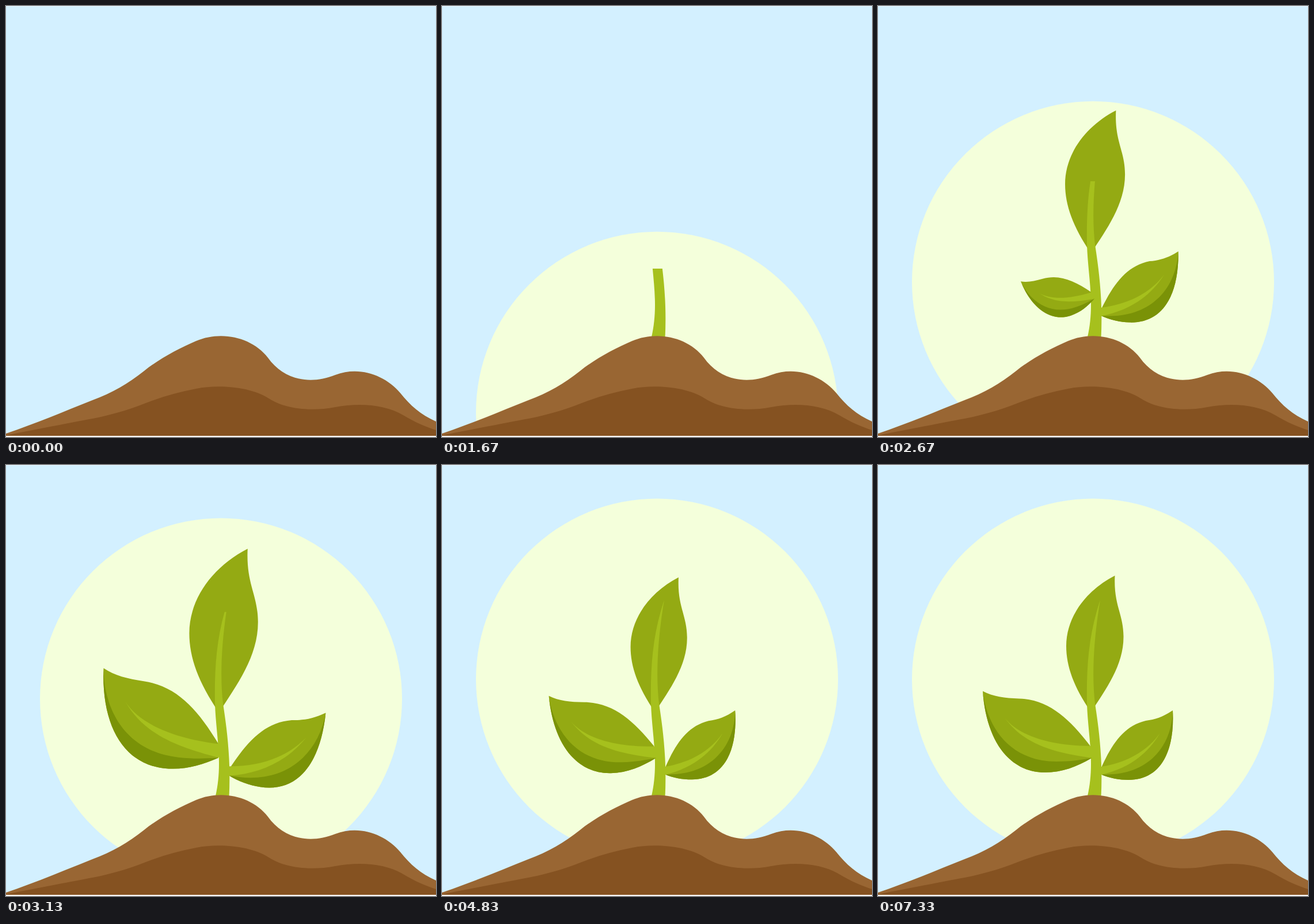
Write an HTML page that moves like this. It is 747 px wide and 750 px high and loops after 8 s.

```html
<!DOCTYPE html>
<html lang="en">
<head>
<meta charset="utf-8">
<title>Sprouting plant</title>
<style>
  html, body { margin: 0; width: 100%; height: 100%; overflow: hidden; background: #fff; }
  svg { display: block; width: 100%; height: 100%; }
  .sky { fill: #d3f0ff; }
  .sun { fill: #f4ffdb; }
  .soil { fill: #996633; }
  .deep { fill: #855221; }
  .stem { fill: #a6c01d; }
  .leaf { fill: #94aa13; }
  .shade { fill: #7a9207; }
</style>
</head>
<body>
<svg viewBox="0 0 747 750">
  <defs>
    <clipPath id="reveal"><rect id="window" x="340" y="600" width="70" height="500"/></clipPath>
  </defs>
  <rect class="sky" y=".5" width="747" height="747.5"/>
  <circle class="sun" id="sun" cx="373.5" cy="1000" r="314.5"/>

  <path class="leaf" id="top" d="M411.5 192.5C362 218 327 264 327 315C327 350 340 386 370 430C396 390 427 348 426.5 298C426 258 409 244 411.5 192.5Z"/>

  <path class="stem" clip-path="url(#reveal)" d="M364 576C368 558 370 540 370 520C370 485 364 450 363 415C362 350 366 295 386 235C375 300 371 365 377 415C383 455 391 510 387.5 578Z"/>

  <g id="left">
    <path class="leaf" d="M182 393.5C200 403 220 405.5 245 406.5C296 408 332 441 368 488L371 510C345 525 320 535 290 535C228 535 188 480 182 393.5Z"/>
    <path class="shade" d="M182 393.5C188 450 225 516 310 516C335 516 352 513 371 510C345 525 320 535 290 535C228 535 188 480 182 393.5Z"/>
    <path class="stem" d="M221 441C246 472 300 488 368 489L380 490V505L370 509.5C310 501 255 488 221 441Z"/>
  </g>

  <g id="right">
    <path class="leaf" d="M512 427C496 438 482 443 465 445C428 454 408 483 389 524L386 538C402 545 420 548 435 548C487 548 516 505 512 427Z"/>
    <path class="shade" d="M512 427C511 490 468 542 388 538.5C402 545 420 548 435 548C487 548 516 505 512 427Z"/>
    <path class="stem" d="M489.5 467C466 500 430 518 388 525L380 527V537L388 539C431 529 467 506 489.5 467Z"/>
  </g>

  <path class="soil" d="M0 744C50 727 100 706 150 686C185 673 212 657 240 635C266 614 300 596 330 583C375 564 428 577 455 612C482 650 527 660 572 642C615 626 659 643 685 673.5C702 695 720 711 747 723V748H0Z"/>
  <path class="deep" d="M0 747C60 735 130 722 165 715C195 708 220 700 240 692C270 680 300 672 330 666C370 658 425 663 455 682C485 702 530 706 572 698C615 690 660 694 690 712C710 724 728 732 747 738V748H0Z"/>
  <rect y="748" width="747" height="2" fill="#fff"/>
</svg>
<script>
  const LOOP = 8000;
  const $ = id => document.getElementById(id);

  // Distance the sun still has to climb: [ms, px]
  const climb = [
    [0, 600], [500, 560], [900, 500], [1300, 419.5], [1670, 334.5], [2130, 223.5],
    [2670, 107.5], [2970, 56.5], [3130, 34], [3300, 16], [3500, 3.7], [3670, 0], [LOOP, 0]
  ];

  // Leaves pop out of their joints: [id, start ms, joint x, joint y, turn in degrees]
  const leaves = [
    ['top', 2000, 370, 427, 0],
    ['right', 2000, 384, 533, 45],
    ['left', 2330, 380, 505, 45]
  ];

  // Smooth curve through the keys
  function follow(keys, t) {
    const last = keys.length - 1;
    let i = 0;
    while (i < last - 1 && t >= keys[i + 1][0]) i++;
    const [t0, v0] = keys[i], [t1, v1] = keys[i + 1];
    if (v0 === v1) return v0;
    const slope = k => {
      if (k === 0 || k >= last - 1) return 0;
      const [a, va] = keys[k - 1], [b, vb] = keys[k + 1];
      return (vb - va) / (b - a);
    };
    const d = t1 - t0, u = (t - t0) / d, w = 1 - u;
    return w * w * ((1 + 2 * u) * v0 + u * d * slope(i)) +
           u * u * ((3 - 2 * u) * v1 - w * d * slope(i + 1));
  }

  function elastic(x) {
    if (x <= 0) return 0;
    if (x >= 1) return 1;
    return 1 + 2 ** (-10 * x) * Math.sin((x - 0.125) * 4 * Math.PI);
  }

  function draw(t) {
    const rest = follow(climb, t);
    $('sun').setAttribute('cy', 373 + rest);
    $('window').setAttribute('y', 233 + 0.67 * rest);

    for (const [id, start, x, y, turn] of leaves) {
      const size = elastic((t - start) / 5000);
      const angle = turn * (size - 1);
      $(id).setAttribute('transform',
        `translate(${x} ${y}) rotate(${angle}) scale(${size}) translate(${-x} ${-y})`);
    }
  }

  const begin = performance.now();
  function tick() {
    draw((performance.now() - begin) % LOOP);
    requestAnimationFrame(tick);
  }
  tick();
</script>
</body>
</html>
```
